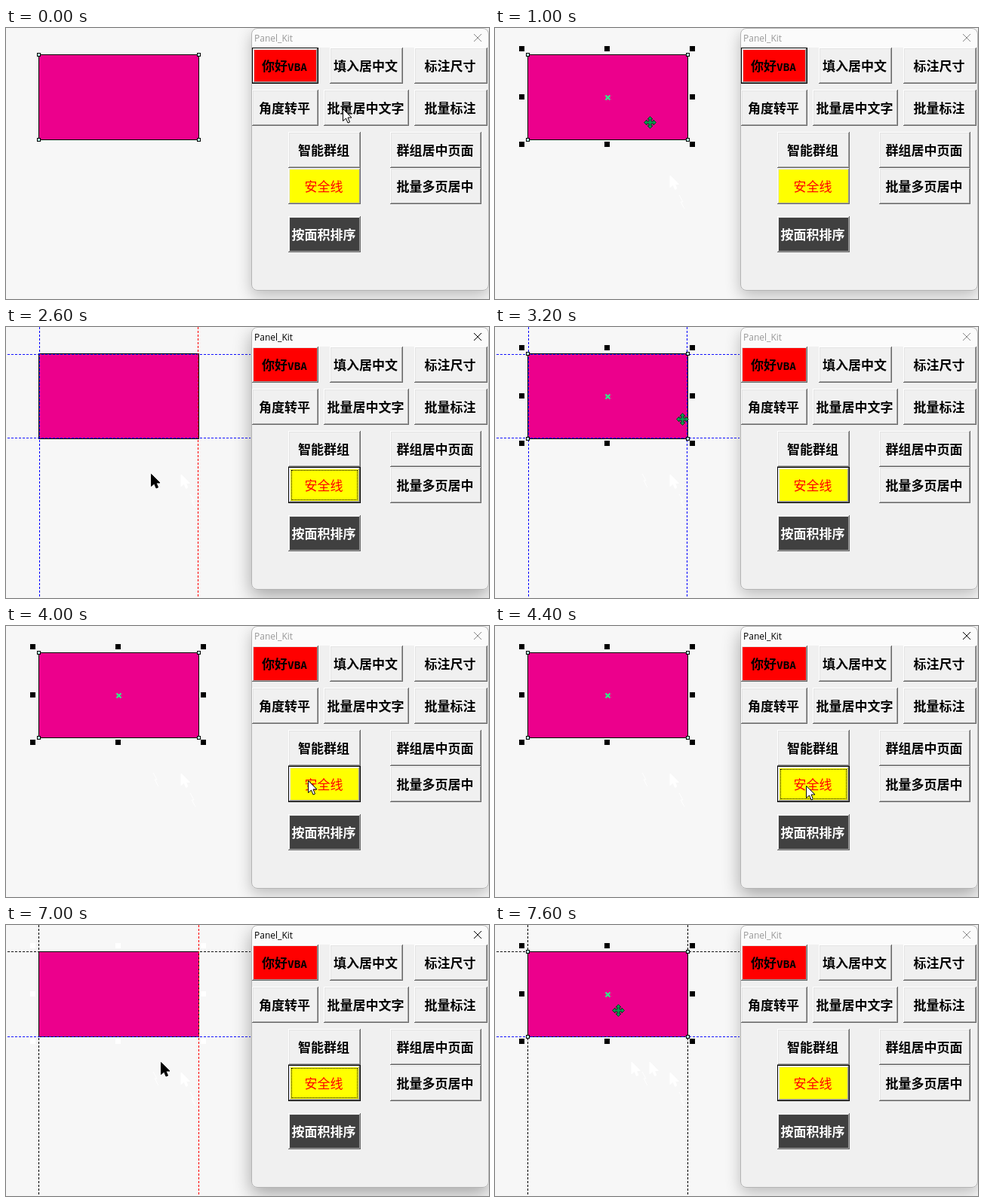
Animation of 640x360 px, one loop 8000 ms. Source, as an HTML page:

```html
<!DOCTYPE html>
<html lang="zh-CN">
<head>
<meta charset="utf-8">
<title>Panel_Kit</title>
<style>
html, body { margin: 0; width: 100%; height: 100%; overflow: hidden; background: #f7f7f7; }
svg { position: absolute; left: 0; top: 0; }
.sharp { shape-rendering: crispEdges; }
#panel {
  position: absolute; left: 325px; top: 0; width: 315px; height: 349px; box-sizing: border-box;
  border: 1px solid #b4b4b4; border-radius: 8px; background: linear-gradient(#fbfbfb 25px, #f0f0f0 25px);
  box-shadow: 0 7px 20px rgba(0, 0, 0, .24);
}
#panel.active { box-shadow: 0 9px 24px rgba(0, 0, 0, .33); }
#title { position: absolute; left: 3px; top: 4px; font: 12px/17px "Open Sans", "Noto Sans", sans-serif; color: #999; }
.active #title { color: #000; }
#close { stroke: #888; }
.active #close { stroke: #000; }
.btn {
  position: absolute; height: 48px; background: #f0f0f0; color: #000; text-align: center; white-space: nowrap;
  font: bold 17px/48px "Noto Sans CJK SC", "Noto Sans CJK JP", "Noto Sans CJK", sans-serif; text-indent: -2px;
  box-shadow: inset -1px -1px #696969, inset 1px 1px #fff, inset -2px -2px #a0a0a0, inset 2px 2px #e3e3e3;
}
.btn small { font: bold 14.4px "DejaVu Sans Mono", monospace; }
.focus {
  box-shadow: inset 0 0 0 1px #000, inset -2px -2px #696969, inset 2px 2px #fff,
    inset -3px -3px #a0a0a0, inset 3px 3px #e3e3e3;
}
.active .focus::after { content: ""; position: absolute; inset: 4px; border: 1px dotted #000; }
</style>
</head>
<body>
<svg width="640" height="360">
  <defs>
    <path id="arrow" d="M0 0V16L4 12.5L6.5 18.5L9 17.5L6.5 11.5H11.5Z"/>
    <path id="scratch" d="M2 0l5 9h-3l5 9" fill="none"/>
    <path id="double" d="M-7 0l4-3v2h6v-2l4 3l-4 3v-2h-6v2z"/>
    <g id="turn">
      <path d="M32 31Q32 24 39 24" fill="none" stroke="#000" stroke-width="2.4"/>
      <path d="M29 28.5L36 31.5L29.5 35.5ZM36.5 21H43.5L39.5 28Z"/>
    </g>
    <path id="move" d="M0-8l3.5 3.5h-2v3h3v-2L8 0l-3.5 3.5v-2h-3v3h2L0 8l-3.5-3.5h2v-3h-3v2L-8 0l3.5-3.5v2h3v-3h-2z"/>
  </defs>
  <g id="trails" fill="#fff" stroke="#fff"></g>
  <rect class="sharp" x="43.5" y="35.5" width="212" height="113" fill="#ec008c" stroke="#000"/>
  <g id="guides" class="sharp" stroke-dasharray="3 2"></g>
  <g id="nodes" class="sharp" fill="#bfe" stroke="#000"></g>
  <g id="squares" class="sharp"></g>
  <path id="cross" d="M146.5 89.5l6 6m0-6l-6 6" stroke="#2cf58a" stroke-width="2"/>
  <g id="rotors">
    <circle cx="149.5" cy="92.5" r="6" fill="none" stroke="#3b9a70"/>
    <rect x="148" y="91" width="3" height="3" fill="#2cf58a"/>
  </g>
</svg>
<div id="panel">
  <div id="title">Panel_Kit</div>
  <svg width="313" height="26"><path id="close" d="M294 7l10 10m0-10l-10 10"/></svg>
</div>
<svg width="640" height="360"><use id="cursor"/></svg>
<script>
const $ = id => document.getElementById(id);
const panel = $('panel'), cursor = $('cursor');

// label, left, top, width, background, colour
const buttons = [
  ['你好<small>VBA</small>', 326, 26, 88, '#f00'],
  ['填入居中文', 429, 26, 97],
  ['标注尺寸', 541, 26, 97],
  ['角度转平', 326, 82, 88],
  ['批量居中文字', 421, 82, 113],
  ['批量标注', 541, 82, 97],
  ['智能群组', 374, 138, 96],
  ['群组居中页面', 509, 138, 121],
  ['安全线', 374, 186, 96, '#ff0', '#f00'],
  ['批量多页居中', 509, 186, 121],
  ['按面积排序', 374, 250, 96, '#404040', '#fff']
].map(([label, x, y, w, background = '', color = '']) => {
  const el = document.createElement('div');
  el.className = 'btn';
  el.innerHTML = label;
  Object.assign(el.style, { left: x - 326 + 'px', top: y - 1 + 'px', width: w + 'px', background, color });
  return panel.appendChild(el);
});
const helloButton = buttons[0], safeButton = buttons[8];
safeButton.style.fontWeight = 'normal';

const square = (x, y, s) => `<rect x="${x - s / 2}" y="${y - s / 2}" width="${s}" height="${s}"/>`;
const use = (id, transform) => `<use href="#${id}" transform="${transform}"/>`;

for (const x of [43.5, 255.5]) for (const y of [35.5, 148.5]) $('nodes').innerHTML += square(x, y, 4);
for (const x of [35.5, 148.5, 261.5]) for (const y of [27.5, 91.5, 154.5])
  if (x != 148.5 || y != 91.5) $('squares').innerHTML += square(x, y, 7);
$('rotors').innerHTML +=
  ['', 'translate(299 0) scale(-1 1)', 'translate(0 184) scale(1 -1)', 'translate(299 184) scale(-1)']
    .map(t => use('turn', t)).join('') +
  ['149 28.5', '149 155.5', '36.5 92.5) rotate(90', '262.5 92.5) rotate(90']
    .map(p => use('double', `translate(${p})`)).join('');

// inset, then the colours of top, bottom and left; the right one is red while the panel is active
const guideSets = {
  inner: [1, '#00f', '#00f', '#00f'],
  outer: [0, '#000', '#00f', '#000']
};
function guideLines(name, active) {
  if (!guideSets[name]) return '';
  const [inset, top, bottom, side] = guideSets[name];
  const line = (d, colour) => `<path d="${d}" stroke="${colour}"/>`;
  return line(`M2 ${35.5 + inset}H324`, top) + line(`M2 ${148.5 - inset}H324`, bottom) +
    line(`M${43.5 + inset} 0V360`, side) + line(`M${255.5 - inset} 0V360`, active ? '#f00' : side);
}

// Pale marks the pointer leaves on the page: start, x, y, shape
const trails = [
  [800, 242, 222, 'scratch'], [1000, 232, 196, 'arrow'], [2800, 193, 195, 'scratch'],
  [7200, 205, 182, 'arrow'], [7400, 181, 182, 'arrow']
];

// start, x, y, pointer, handles, guides, panel active
const steps = [
  [0, 446, 107, 'white', 'nodes', '', 0],
  [200, 428, 120, 'white', 'nodes', '', 0],
  [400, 350, 178, 'white', 'nodes', '', 0],
  [600, 242, 222, 'white', 'nodes', '', 0],
  [800, 232, 196, 'black', 'nodes', '', 0],
  [1000, 205, 125, 'move', 'squares', '', 0],
  [1200, 200, 118, 'move', 'squares', '', 0],
  [1400, 200, 118, 'move', 'rotors', '', 0],
  [1600, 345, 180, 'white', 'rotors', '', 0],
  [1800, 407, 206, 'white', 'rotors', '', 0],
  [2000, 407, 206, 'white', '', 'inner', 1],
  [2400, 350, 205, 'white', '', 'inner', 1],
  [2600, 192, 195, 'black', '', 'inner', 1],
  [2800, 205, 130, 'move', 'nodes', 'inner', 0],
  [3000, 215, 124, 'move', 'squares', 'inner', 0],
  [3200, 248, 122, 'move', 'squares', 'inner', 0],
  [3600, 300, 150, 'black', 'squares', '', 0],
  [3800, 362, 182, 'white', 'squares', '', 0],
  [4000, 400, 205, 'white', 'squares', '', 0],
  [4200, 412, 212, 'white', 'squares', '', 0],
  [4400, 412, 212, 'white', 'squares', '', 1],
  [5400, 412, 212, 'white', '', 'outer', 1],
  [6400, 385, 207, 'white', '', 'outer', 1],
  [6600, 335, 199, 'white', '', 'outer', 1],
  [6800, 265, 190, 'black', '', 'outer', 1],
  [7000, 205, 182, 'black', '', 'outer', 1],
  [7200, 181, 182, 'black', '', 'outer', 1],
  [7400, 163, 113, 'move', 'nodes', 'outer', 0],
  [7600, 163, 113, 'move', 'squares', 'outer', 0]
];
const pointers = {
  white: ['arrow', '#fff', '#000'],
  black: ['arrow', '#000', '#000'],
  move: ['move', '#0b9a50', '#04401f']
};

const show = (id, on) => $(id).style.display = on ? '' : 'none';
let current;

function draw(step) {
  const [t, x, y, pointer, handles, guides, active] = step;
  const [shape, fill, stroke] = pointers[pointer];
  const pale = t >= 5400 && !handles;
  cursor.setAttribute('href', '#' + shape);
  cursor.setAttribute('transform', `translate(${x + .5} ${y + .5})`);
  cursor.setAttribute('fill', fill);
  cursor.setAttribute('stroke', stroke);
  show('nodes', handles);
  show('squares', handles == 'squares' || pale);
  $('squares').setAttribute('fill', pale ? '#fff' : '#000');
  show('cross', handles == 'squares');
  show('rotors', handles == 'rotors');
  $('guides').innerHTML = guideLines(guides, active);
  $('trails').innerHTML = trails.filter(m => t >= m[0])
    .map(([, mx, my, mark]) => use(mark, `translate(${mx} ${my})`)).join('');
  panel.classList.toggle('active', active);
  helloButton.classList.toggle('focus', t < 2000);
  safeButton.classList.toggle('focus', t >= 2000);
}

function tick() {
  const t = performance.now() % 8000;
  const step = steps.findLast(s => s[0] <= t);
  if (step != current) draw(current = step);
  requestAnimationFrame(tick);
}
tick();
</script>
</body>
</html>
```
